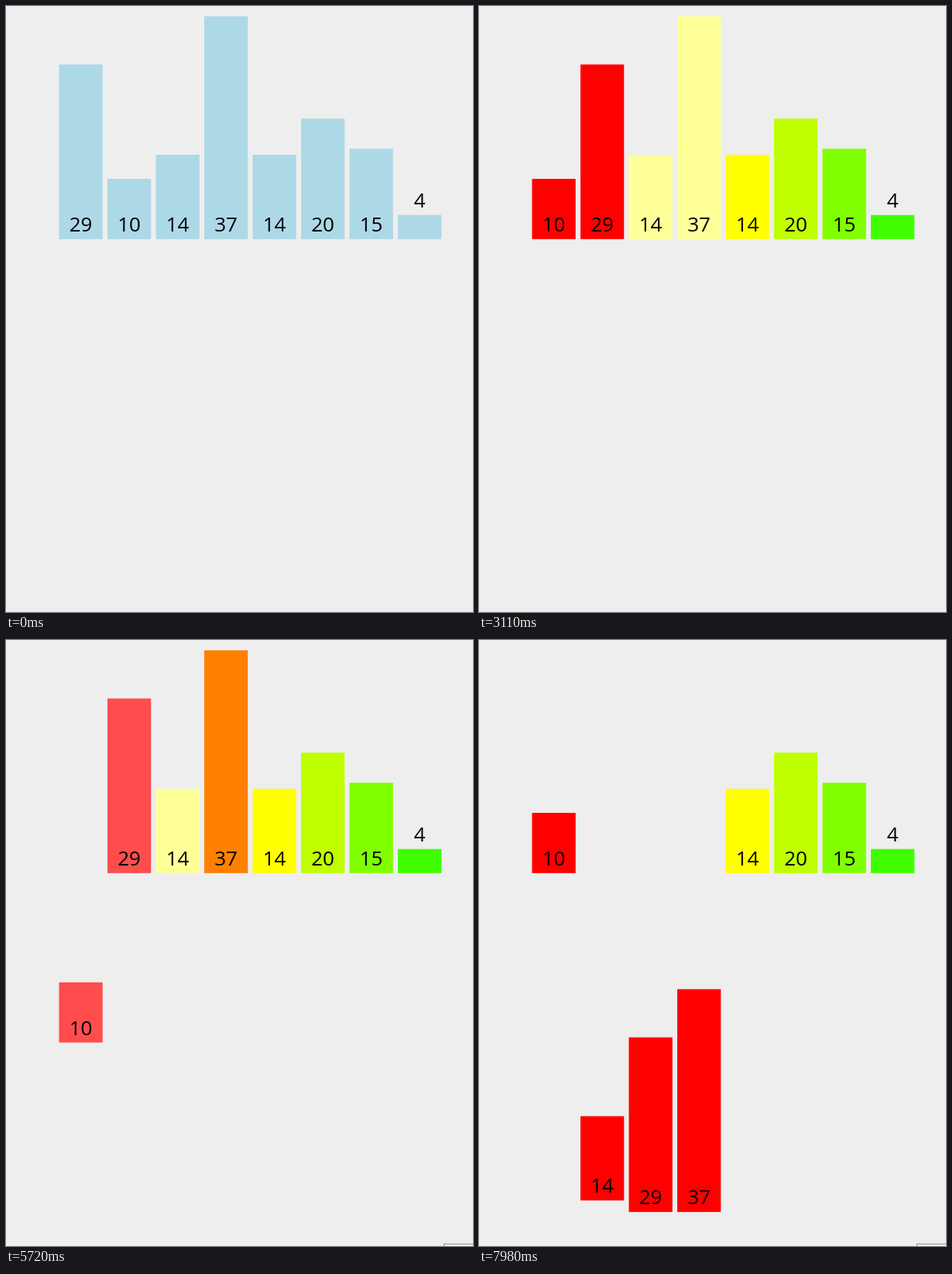
Write an HTML page that moves like this. It is 603 by 782 pixels and loops after 8000 ms.

```html
<!DOCTYPE html>
<html lang="en">
<head>
<meta charset="utf-8">
<title>Merge sort bars</title>
<style>
  html, body { margin: 0; width: 100%; height: 100%; overflow: hidden; background: #eee; }
  svg { display: block; width: 603px; height: 782px; }
  text { font: 26px "Open Sans", "Noto Sans", sans-serif; text-anchor: middle; }
</style>
</head>
<body>
<svg id="stage" viewBox="0 0 603 782">
  <g id="bars"></g>
  <g id="labels"></g>
  <rect id="popup" x="565.5" y="779.5" width="50" height="20" fill="#fff" stroke="#868686"/>
</svg>
<script>
const LOOP = 8000, TICK = 70, DURATION = 250, POPUP_AT = 4620;
const LEFT = 68.5, PITCH = 62.5, WIDTH = 56.25;
const BASE = 300.8, DROP = 437.3, UNIT = 7.77;

const values = [29, 10, 14, 37, 14, 20, 15, 4];
const RED = [255, 0, 0], ORANGE = [255, 128, 0], BLUE = [173, 216, 230];

const lighten = c => c.map(v => Math.min(255, v + 153));
const mix = (a, b, p) => a + (b - a) * p;
const ease = p => p < 0.5 ? 4 * p ** 3 : 1 - 4 * (1 - p) ** 3;

// Hues run from red towards green in 15 degree steps.
const groupColor = i => [Math.min(255, (8 - i) * 64), Math.min(255, i * 64), 0];

// Each action returns the next pose of one bar.
const paint = (id, color) => ({ id, next: s => ({ ...s, color }) });
const light = id => ({ id, next: s => ({ ...s, color: lighten(s.color) }) });
const down = (id, col, color) => ({ id, next: () => ({ col, low: 1, color }) });
const up = id => ({ id, next: s => ({ ...s, low: 0 }) });

// First visible change, last change, time already run at the first change, actions
const events = [
  [130, 350, 55, values.map((v, i) => paint(i, groupColor(i)))],
  [610, 820, 62, [light(0), light(1)]],
  [1020, 1300, 25, [down(1, 0, RED)]],
  [1500, 1770, 32, [down(0, 1, RED)]],
  [1970, 2250, 36, [up(1)]],
  [2450, 2650, 56, [up(0)]],
  [2910, 3110, 58, [light(2), light(3)]],
  [3380, 3590, 65, [down(2, 2, ORANGE)]],
  [3790, 4070, 35, [down(3, 3, ORANGE)]],
  [4270, 4480, 58, [up(2)]],
  [4750, 4960, 65, [up(3)]],
  [5160, 5380, 50, [light(1), light(2)]],
  [5650, 5860, 55, [down(1, 0, RED), light(0)]],
  [6130, 6340, 58, [down(2, 1, RED), light(3)]],
  [6610, 6820, 72, [down(0, 2, RED)]],
  [7020, 7300, 25, [down(3, 3, RED)]],
  [7500, 7780, 35, [up(1)]],
  [7980, 8190, 51, [up(2)]]
];

const make = (tag, parent) => document.getElementById(parent)
  .appendChild(document.createElementNS("http://www.w3.org/2000/svg", tag));

const parts = values.map(value => {
  const bar = make("rect", "bars"), label = make("text", "labels");
  bar.setAttribute("width", WIDTH);
  bar.setAttribute("height", value * UNIT);
  label.textContent = value;
  return { value, bar, label };
});
const popup = document.getElementById("popup");

// Motion advances in discrete ticks and settles on the last one.
function progress(t, start, end, lead) {
  const last = Math.round((end - start) / TICK);
  const tick = Math.floor((t - start) * last / (end - start) + 0.001);
  return tick >= last ? 1 : ease(Math.min(1, (lead + tick * TICK) / DURATION));
}

function blend(a, b, p) {
  return {
    col: mix(a.col, b.col, p),
    low: mix(a.low, b.low, p),
    color: a.color.map((v, i) => mix(v, b.color[i], p))
  };
}

function posesAt(t) {
  const poses = values.map((v, col) => ({ col, low: 0, color: BLUE }));
  for (const [start, end, lead, actions] of events) {
    if (t < start) break;
    const p = progress(t, start, end, lead);
    for (const { id, next } of actions) poses[id] = blend(poses[id], next(poses[id]), p);
  }
  return poses;
}

function draw(t) {
  posesAt(t).forEach(({ col, low, color }, i) => {
    const { value, bar, label } = parts[i];
    const x = LEFT + col * PITCH, bottom = BASE + low * DROP;
    const top = bottom - value * UNIT;
    bar.setAttribute("x", x);
    bar.setAttribute("y", top);
    bar.setAttribute("fill", `rgb(${color.map(Math.round)})`);
    label.setAttribute("x", x + WIDTH / 2);
    label.setAttribute("y", (value < 5 ? top : bottom) - 9.8);
  });
  popup.setAttribute("visibility", t >= POPUP_AT ? "visible" : "hidden");
}

function frame() {
  draw(performance.now() % LOOP);
  requestAnimationFrame(frame);
}
frame();
</script>
</body>
</html>
```
